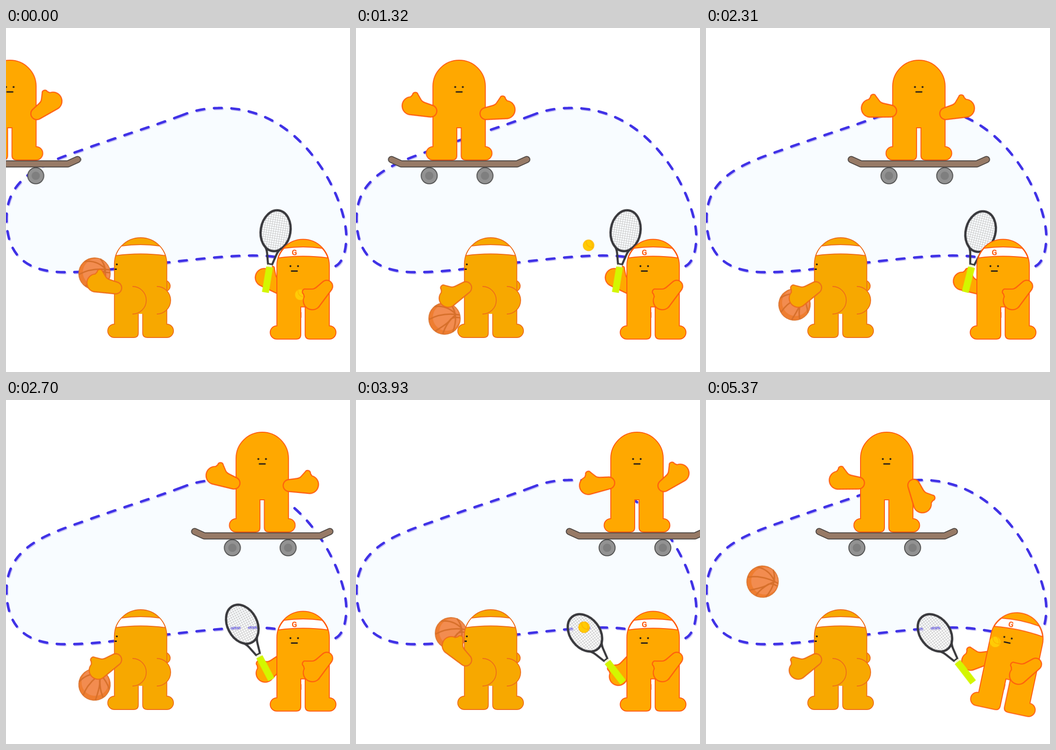
Recreate the animation shown at these times as an HTML page without scripts. Size 748x748 px, loop 5400 ms.

```html
<!DOCTYPE html>
<html lang="en">
<head>
<meta charset="utf-8">
<title>Sports day</title>
<style>
html, body { margin: 0; height: 100%; overflow: hidden; background: #fff; }
svg { display: block; width: 100vw; height: 100vh; }
.move { animation: 5400ms linear infinite; }
.fig { fill: #ffa800; stroke: #ff5a0f; stroke-width: 2; }
.back { fill: #f7a800; stroke: #ee6c1a; stroke-width: 1.8; }
.line { fill: none; }
.ink { fill: #2b2118; stroke: none; }
.dash { fill: none; stroke-width: 5.4; stroke-linecap: round; stroke-dasharray: 17 21.17; }
.deck { fill: none; stroke-linecap: round; stroke-linejoin: round; }

.skater { animation-name: ride; }
@keyframes ride {
  0%, 8%       { transform: translateX(8.5px); }
  24.444%      { transform: translateX(224px); }
  29.444%      { transform: translateX(284px); }
  35%          { transform: translateX(361px); }
  50%          { transform: translateX(557px); }
  54.6%, 77.67% { transform: translateX(611px); }
  86.667%      { transform: translateX(423px); }
  88.1%, 100%  { transform: translateX(393px); }
}
.sway-l { animation-name: sway-l; animation-timing-function: ease-in-out; }
@keyframes sway-l {
  0%, 8.33% { transform: rotate(-7deg); }
  24.444%   { transform: rotate(15deg); }
  27%       { transform: rotate(16deg); }
  35%       { transform: rotate(-8deg); }
  50%       { transform: rotate(22deg); }
  60%, 95%  { transform: rotate(-7deg); }
  99.44%, 100% { transform: rotate(8deg); }
}
.sway-r { animation-name: sway-r; animation-timing-function: ease-in-out; }
@keyframes sway-r {
  0%, 8.33% { transform: rotate(38deg); }
  24.444%   { transform: rotate(11deg); }
  27%       { transform: rotate(9deg); }
  35%       { transform: rotate(29deg); }
  50%       { transform: rotate(3deg); }
  60%, 95%  { transform: rotate(38deg); }
  99.44%, 100% { transform: rotate(-65deg); }
}

.hoop { animation-name: hoop; animation-timing-function: cubic-bezier(.37, 0, .63, 1); }
@keyframes hoop {
  0%, 15.7% { transform: translate(192.5px, 534px); }
  26.1%     { transform: translate(192.5px, 638px); }
  36.5%     { transform: translate(192.5px, 534px); }
  47.1%     { transform: translate(192.5px, 638px) rotate(-40deg); }
  57.35%    { transform: translate(192.5px, 534px) rotate(-40deg); }
  64.8%     { transform: translate(192.5px, 615px) rotate(-10deg); }
  72.78%    { transform: translate(206.5px, 508px); animation-timing-function: ease-out; }
  79.6%     { transform: translate(200px, 310px); animation-timing-function: ease-in; }
  86.667%   { transform: translate(169px, 406px); animation-timing-function: linear; }
  94.8%     { transform: translate(42px, 420px) rotate(-20deg); animation-timing-function: linear; }
  99.44%, 100% { transform: translate(123px, 395px) rotate(20deg); }
}
.dribble { animation-name: dribble; animation-timing-function: ease-in-out; }
@keyframes dribble {
  0%, 14%      { transform: rotate(14deg); }
  18.3%, 29.5% { transform: rotate(-31deg); }
  35%          { transform: rotate(0deg); }
  37%          { transform: rotate(12deg); }
  41.5%, 50.5% { transform: rotate(-31deg); }
  57.4%        { transform: rotate(12deg); }
  62%, 66%     { transform: rotate(-31deg); }
  72.78%       { transform: rotate(45deg); }
  78%, 100%    { transform: rotate(-31deg); }
}

.racket { animation-name: swing; animation-timing-function: ease-in-out; }
@keyframes swing {
  0%, 29.4%   { transform: translate(564px, 575px) rotate(9.4deg); }
  35%, 40%    { transform: translate(561px, 568px) rotate(22.4deg); }
  50%         { transform: translate(577px, 608px) rotate(-27.7deg); }
  54%, 100%   { transform: translate(581px, 614px) rotate(-37.7deg); }
}
.grip { animation-name: grip; animation-timing-function: ease-in-out; }
@keyframes grip {
  0%, 40%  { transform: rotate(34deg); }
  50%      { transform: rotate(-38deg); }
  54%, 97% { transform: rotate(-51deg); }
  99.44%, 100% { transform: rotate(-24deg); }
}
.tilt { animation-name: tilt; transform-origin: 646px 660px; }
@keyframes tilt {
  0%, 97.4% { transform: rotate(0deg); }
  99.44%, 100% { transform: rotate(12deg); }
}
.tennis { animation-name: tennis; }
@keyframes tennis {
  0%, 8.3% { transform: translate(640px, 580px); visibility: visible; }
  24.444%  { transform: translate(506px, 473px); }
  33.2%    { transform: translate(385px, 260px); visibility: visible; }
  33.3%    { transform: translate(385px, 260px); visibility: hidden; }
  65.9%    { transform: translate(560px, 270px); visibility: hidden; }
  66%      { transform: translate(560px, 270px); visibility: visible; }
  72.78%   { transform: translate(496px, 494px); }
  85.2%    { transform: translate(372px, 586px); }
  86.667%  { transform: translate(392px, 588px); animation-timing-function: ease-in; }
  91.7%    { transform: translate(480px, 632px); animation-timing-function: ease-out; }
  98%, 100% { transform: translate(629px, 526px); visibility: visible; }
}
</style>
</head>
<body>
<svg viewBox="0 0 748 748">
  <defs>
    <path id="body" d="M-57 127A57 57 0 0 1 57 127V258a14.5 14.5 0 0 1 0 29H15Q4.5 287 4.5 277V217H-5V277Q-5 287 -15 287H-57a14.5 14.5 0 0 1 0-29Z"/>
    <path id="band" fill="#fff" d="M-41.6 88Q0 82 41.6 88A57 57 0 0 1 54 109Q0 101.5 -54 109A57 57 0 0 1 -41.6 88Z"/>
    <path id="arm" stroke-width="2.3" d="M0-13A13 13 0 0 1 1 13L-43 19.5A19.5 19.5 0 0 1 -50-18.5L-47-24A6 6 0 0 1 -36-28L-26-18Q-23-15 -18-14.5Z"/>
    <g id="face" class="ink">
      <circle cx="-8.5" cy="128.3" r="2.1"/>
      <circle cx="8" cy="128.3" r="2.1"/>
      <rect x="-7.5" y="137.6" width="15" height="3" rx="1"/>
    </g>
    <g id="wheel">
      <circle r="17.5" fill="#929292" stroke="#515151" stroke-width="2"/>
      <circle r="9" fill="#7f7f7f"/>
    </g>
    <path id="loop" d="M378 191.5L390 187C413 178 440 174 461 174C562 171 638 228 690 310C722 361 741 420 740 458C738 505 722 521 705 520C680 518 640 504 580 497C520 490 430 501 350 510C270 519 200 531 130 531C50 531 2 500 1 415C1 325 80 295 160 267C240 238 315 215 378 191.5"/>
    <path id="board" d="M-147 286L-126 295.5H126L147 286"/>
    <pattern id="net" width="5" height="5" patternUnits="userSpaceOnUse">
      <path d="M0 .5H5M.5 0V5" stroke="#c6c6c6" fill="none"/>
    </pattern>
  </defs>

  <use href="#loop" fill="#f8fcff"/>
  <use href="#loop" class="dash" x="1.5" y="2" stroke="#cbc6f8"/>
  <use href="#loop" class="dash" stroke="#4032e6"/>

  <!-- basketball player -->
  <g class="move hoop">
    <circle r="34.5" fill="#ee7d30"/>
    <circle cx="4" cy="-3" r="29.5" fill="#f28c50"/>
    <g class="line" stroke="#d66f2a" stroke-width="3">
      <circle r="34.3" stroke-width="1.5"/>
      <path d="M-34 2Q-5-14 33-8M-22-26Q5-30 25-9M-20 27Q8 10 12 3T33-2M13-32Q32-8 18 29M-4 34Q4 8 25-9"/>
    </g>
  </g>
  <g class="back">
    <circle cx="345" cy="561" r="12"/>
    <g transform="translate(292.7 386)">
      <use href="#body"/>
      <use href="#band"/>
    </g>
    <rect x="286" y="600" width="13" height="21.5" stroke="none"/>
    <path d="M328 562A30 30 0 0 1 328 622"/>
    <path class="line" d="M275 562A30 30 0 0 1 275 622"/>
    <circle class="ink" cx="241" cy="514" r="2.1"/>
    <rect class="ink" x="236" y="523" width="5" height="3"/>
    <g transform="translate(238 565)"><use href="#arm" class="move dribble"/></g>
  </g>

  <!-- tennis player -->
  <g class="fig move tilt">
    <g transform="translate(598 567)"><use href="#arm" class="move grip"/></g>
  </g>
  <g class="move racket">
    <ellipse cy="-136" rx="32.3" ry="44.7" fill="#fff" fill-opacity=".35"/>
    <ellipse cy="-136" rx="32.3" ry="44.7" fill="url(#net)" stroke="#38383c" stroke-width="5"/>
    <path class="line" stroke="#38383c" stroke-width="4.5" d="M-6-62H6M-4.5-62L-10-84Q-12-93 -19-101M4.5-62L10-84Q12-93 19-101"/>
    <rect x="-5" y="-61" width="10" height="6" fill="#f1f6cf"/>
    <rect x="-7.5" y="-56" width="15" height="56" fill="#d3f600"/>
  </g>
  <g class="fig move tilt">
    <g transform="translate(646 389.5)">
      <use href="#body"/>
      <use href="#band" y="1.5"/>
      <use href="#face" x="-19"/>
    </g>
    <path d="M641.5 618V630"/>
    <text x="627" y="494" text-anchor="middle" font-family="Roboto, Arial, sans-serif" font-size="17" font-weight="700" fill="#ff5a0f" stroke="none">G</text>
  </g>
  <g class="move tennis">
    <circle r="11.8" fill="#ffcb05" stroke="#ffb000" stroke-width="1.2"/>
    <path class="line" stroke="#ffb000" stroke-width="1.4" d="M-5-10Q-6 4 10 5M3-11Q10-5 8 5"/>
  </g>
  <g class="fig move tilt">
    <use href="#arm" transform="translate(697 562) rotate(-45)"/>
  </g>

  <!-- skater -->
  <g class="fig move skater">
    <g stroke="none">
      <use href="#wheel" x="-65" y="321.3"/>
      <use href="#wheel" x="56.2" y="321.3"/>
    </g>
    <use href="#board" class="deck" stroke="#4d4744" stroke-width="15.5"/>
    <use href="#board" class="deck" stroke="#977a66" stroke-width="11.5"/>
    <use href="#body"/>
    <use href="#face"/>
    <g transform="translate(-62 180.5)"><use href="#arm" class="move sway-l"/></g>
    <g transform="translate(59 186) scale(-1 1)"><use href="#arm" class="move sway-r"/></g>
  </g>
</svg>
</body>
</html>
```
